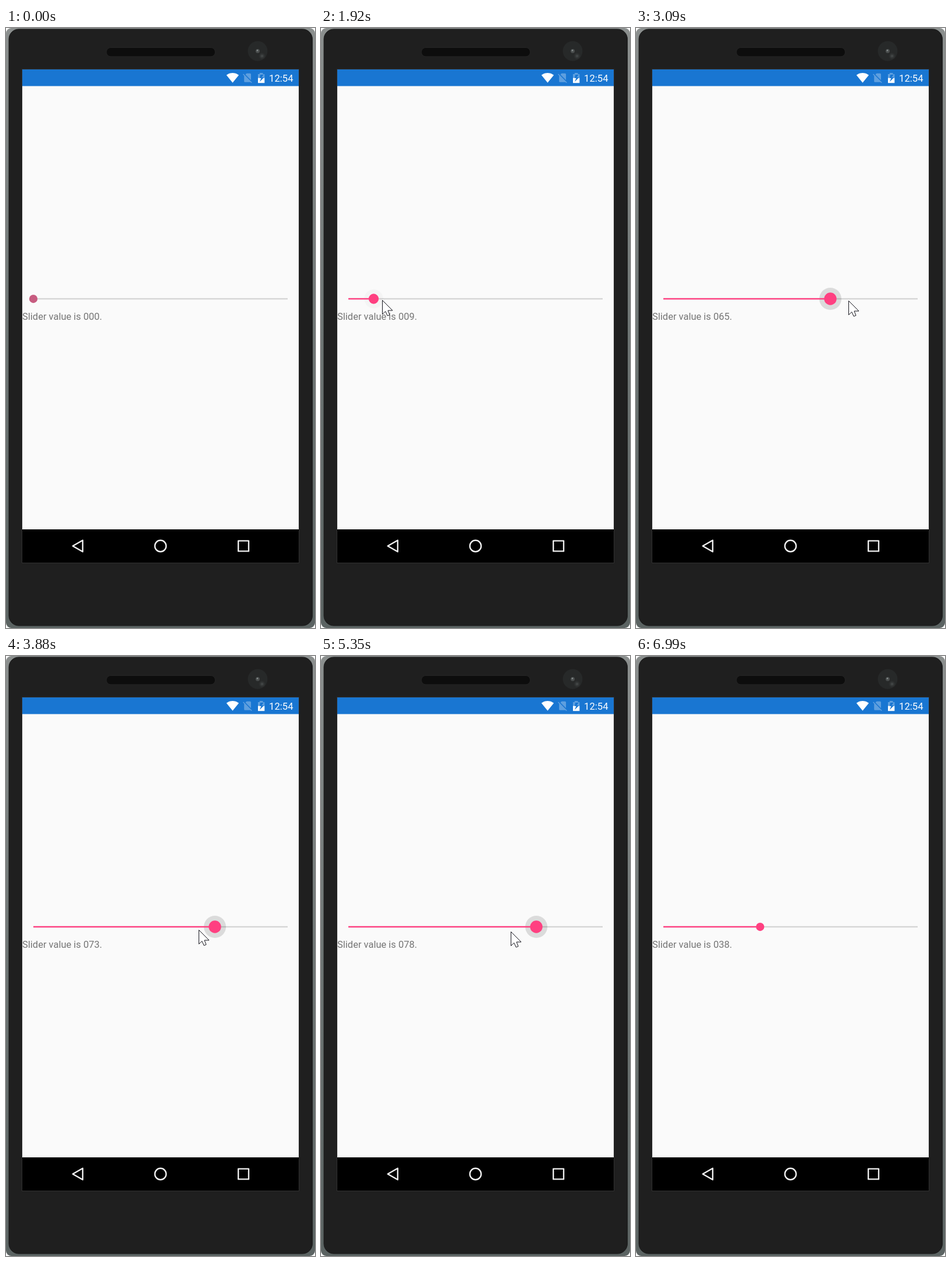
An HTML page with a canvas for the animation above (7.75 s loop, 531x1028 px).

```html
<!DOCTYPE html>
<html lang="en">
<head>
<meta charset="utf-8">
<title>Slider demo</title>
<style>
html, body { margin: 0; width: 100%; height: 100%; overflow: hidden; background: #fff; }
canvas { display: block; width: 531px; height: 1028px; }
</style>
</head>
<body>
<canvas id="stage" width="531" height="1028"></canvas>
<script>
const ctx = document.getElementById('stage').getContext('2d');
const LOOP = 7750;
const DP = 475 / 400;
const PINK = '#ff4081';
const BLUE = '#1976d2';
const FAINT = 'rgba(255,255,255,.3)';
const TRACK = { left: 47, right: 484, y: 464 };

// Moments of the story
const ENTER = 130, PRESS = 1680, RELEASE = 6210, EXIT = 6990;
const LAG = 115;

// Pointer during the drag: [time, position]
const dragX = [
  [1600, 47], [1809, 90.5], [1924, 105], [2979, 334], [3094, 365],
  [3600, 394], [3759, 359], [3874, 331], [4390, 226], [4695, 312],
  [4810, 357], [5150, 419], [5241, 370], [5356, 326], [5709, 213.3]
];
const dragY = [[1600, 463], [1924, 466], [3874, 469], [4810, 476], [5709, 470]];

const clamp = v => Math.min(1, Math.max(0, v));
const ramp = (t, start, span) => clamp((t - start) / span);
const mix = (a, b, p) => a + (b - a) * p;
const easeOut = p => 1 - (1 - p) ** 2;

// The screen refreshes on a steady beat
const beat = t => t < ENTER ? 0 : ENTER + 78 * Math.floor((t - ENTER + 12) / 78);

// Smooth curve through points, level at its turns and ends
function curve(points, t) {
  const last = points.length - 1;
  if (t <= points[0][0]) return points[0][1];
  if (t >= points[last][0]) return points[last][1];
  const slope = i => {
    if (i === 0 || i === last) return 0;
    const [[t0, v0], [, v], [t1, v1]] = points.slice(i - 1, i + 2);
    return (v - v0) * (v1 - v) > 0 ? (v1 - v0) / (t1 - t0) : 0;
  };
  const i = points.findIndex(k => k[0] > t);
  const [t0, v0] = points[i - 1], [t1, v1] = points[i];
  const span = t1 - t0, p = (t - t0) / span, q = 1 - p;
  return mix(v0, v1, p * p * (3 - 2 * p)) + span * p * q * (slope(i - 1) * q - slope(i) * p);
}

function pointerAt(t) {
  if (t < 1600) {
    const p = easeOut(ramp(t, ENTER, 770));
    return [mix(312, 49, p), mix(769, 472, p) - 9 * ramp(t, 900, 150)];
  }
  const away = ramp(t, 6130, 786);
  return [mix(curve(dragX, t), 475, away), mix(curve(dragY, t), 1010, away)];
}

const thumbAt = t => curve(dragX, t - LAG);

function rect(x, y, w, h, fill) {
  ctx.fillStyle = fill;
  ctx.fillRect(x, y, w, h);
}

function round(x, y, w, h, r, fill, line) {
  ctx.beginPath();
  ctx.roundRect(x, y, w, h, r);
  ctx.fillStyle = fill;
  ctx.fill();
  if (line) {
    ctx.strokeStyle = line;
    ctx.lineWidth = 1;
    ctx.stroke();
  }
}

function disc(x, y, r, fill) {
  ctx.beginPath();
  ctx.arc(x, y, r, 0, Math.PI * 2);
  ctx.fillStyle = fill;
  ctx.fill();
}

function icon(path, x, y, scale, fill) {
  ctx.save();
  ctx.translate(x, y);
  ctx.scale(scale, scale);
  ctx.fillStyle = fill;
  ctx.fill(new Path2D(path));
  ctx.restore();
}

function text(str, x, y, size, fill) {
  ctx.font = `${size}px Roboto, sans-serif`;
  ctx.fillStyle = fill;
  ctx.fillText(str, x, y);
}

function drawPhone() {
  rect(0, 0, 531, 1028, '#fff');
  const rim = ctx.createLinearGradient(0, 0, 0, 1028);
  rim.addColorStop(0, '#8b8f8e');
  rim.addColorStop(0.5, '#6d7473');
  rim.addColorStop(1, '#5b6362');
  round(0, 0, 531, 1028, 9, rim);
  round(5, 2, 521.5, 1022, 17, '#1f1f1f', '#191919');
  round(172.5, 33.5, 187, 15.5, 7.5, '#0d0d0d', '#252525');

  disc(432.5, 39.5, 17, '#272929');
  const glint = ctx.createRadialGradient(440, 48, 0, 440, 48, 7);
  glint.addColorStop(0, '#4c5050');
  glint.addColorStop(1, 'rgba(39,41,41,0)');
  disc(440, 48, 6, glint);
  disc(432.5, 39.5, 3.5, '#4a4e4e');
  disc(432, 38.5, 1.2, '#8c9292');

  rect(27, 70, 477, 847, '#303030');
  rect(28, 71, 475, 845, '#fafafa');
}

function drawStatusBar() {
  rect(28, 71, 475, 24 * DP, BLUE);
  const wifi = 'M13 22L25.6 6.5C25.1 6.1 20.3 2.1 13 2.1S.9 6.1 .4 6.5z';
  const noSim = 'M19 5c0-1.1-.9-2-2-2h-7L7.66 5.34 19 16.68z' +
    'M3.65 3.88L2.38 5.15 5 7.77V19c0 1.1.9 2 2 2h10c.35 0 .67-.1.96-.26l1.88 1.88 1.27-1.27z';
  const bolt = 'M73 0H392L201 259H442L4 703L157 334H0z';
  icon(wifi, 378.5, 75.2, 0.841, '#fff');
  icon(noSim, 405, 75.2, 0.841, FAINT);

  rect(435.8, 77, 5.6, 2, FAINT);
  rect(433, 79, 11.3, 6.5, FAINT);
  rect(433, 85.5, 11.3, 8.7, '#fff');
  icon(bolt, 435.8, 80, 0.0175, BLUE);

  text('12:54', 452.1, 91.8, 14 * DP, '#fff');
}

function drawNavBar() {
  rect(28, 859, 475, 57, '#000');
  ctx.strokeStyle = '#f0f0f0';
  ctx.lineWidth = 2 * DP;
  ctx.lineJoin = 'round';
  ctx.stroke(new Path2D('M114.7 887.5L131.8 877.7V897.3z'));
  ctx.beginPath();
  ctx.arc(265.5, 887.5, 9.7, 0, Math.PI * 2);
  ctx.stroke();
  ctx.strokeRect(399.2, 878.6, 17.8, 17.8);
}

function drawSlider(t) {
  const { left, right, y } = TRACK;
  const x = thumbAt(t);
  const grow = ramp(t, PRESS, 570) - ramp(t, RELEASE, 180);
  const ripple = ramp(t, PRESS, 780);
  const fade = 1 - ramp(t, 5600, 220);
  const top = y - DP, thick = 2 * DP;

  disc(x, y, mix(15, 16 * DP, ripple), `rgba(0,0,0,${0.125 * ripple ** 1.5 * fade})`);
  rect(left, top, right - left, thick, 'rgba(0,0,0,.15)');
  rect(left, top, x - left, thick, PINK);
  disc(x, y, mix(6, 9, grow) * DP, t < PRESS ? '#c75c80' : PINK);

  // The label trails the thumb on the way down
  const seen = Math.max(x, thumbAt(t - 30));
  const value = Math.floor((seen - left) / (right - left) * 100);
  text(`Slider value is ${String(value).padStart(3, '0')}.`, 28, 500, 16.5, '#757575');
}

function drawPointer(t) {
  if (t < ENTER || t >= EXIT) return;
  const [x, y] = pointerAt(t).map(Math.round);
  const arrow = new Path2D('M0 0V24L5.3 19L8.7 26.5L12.5 25L9.5 17.5H17.5z');
  ctx.save();
  ctx.translate(x + 0.5, y + 0.5);
  ctx.fillStyle = '#fff';
  ctx.fill(arrow);
  ctx.strokeStyle = '#14141c';
  ctx.lineWidth = 1;
  ctx.lineJoin = 'miter';
  ctx.stroke(arrow);
  ctx.restore();
}

const began = performance.now();

function frame() {
  const t = beat((performance.now() - began) % LOOP);
  drawPhone();
  drawStatusBar();
  drawNavBar();
  drawSlider(t);
  drawPointer(t);
  requestAnimationFrame(frame);
}

frame();
</script>
</body>
</html>
```
